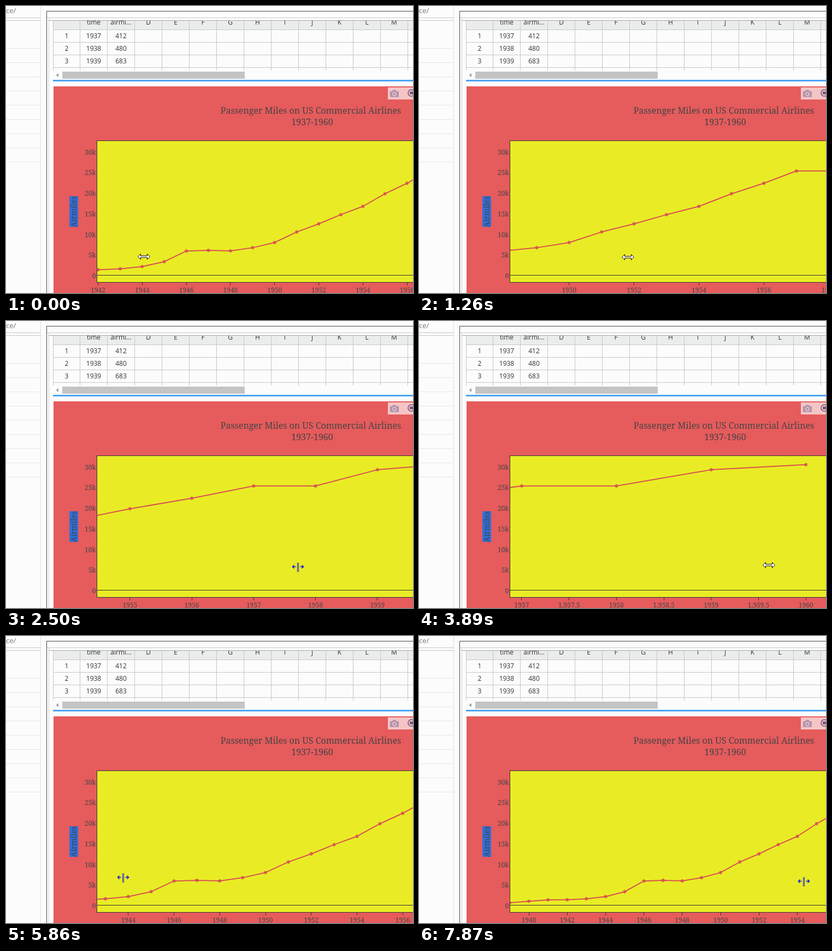
An HTML page that plays this animation: 745x525 px, repeating every 8 s.

```html
<!DOCTYPE html>
<html lang="en">
<head>
<meta charset="utf-8">
<title>Airline passenger miles</title>
<style>
html, body { margin: 0; width: 100%; height: 100%; overflow: hidden; background: #fcfcfc; }
svg { display: block; width: 745px; height: 525px; }
.sans { font: 12px "Open Sans", sans-serif; fill: #333; text-anchor: middle; }
.serif { font: 12px "Noto Serif", serif; fill: #444; text-anchor: middle; }
.title { font-size: 16px; }
.axis { font-size: 14px; }
.end { text-anchor: end; }
.split { mix-blend-mode: difference; }
</style>
</head>
<body>
<svg viewBox="0 0 745 525">
  <defs>
    <clipPath id="plotClip"><rect x="166" y="246" width="579" height="260"/></clipPath>
    <clipPath id="sheetClip"><rect x="78" y="27" width="667" height="91"/></clipPath>
  </defs>
  <rect width="745" height="525" fill="#fcfcfc"/>

  <g fill="none" shape-rendering="crispEdges">
    <path d="M0 21.5H63M0 26.5H63" stroke="#c4c4c4"/>
    <path id="sideRows" stroke="#e6e6e6"/>
    <path d="M63.5 0V525" stroke="#dedede"/>
    <path d="M78.5 22V525" stroke="#d0d0d0"/>
    <path d="M745 9.5H74.5V525" stroke="#484848"/>
    <path d="M75 21.5H745" stroke="#c8c8c8"/>
    <path d="M78 26.5H745" stroke="#a4a4a4"/>
  </g>
  <text x="0" y="13" font-family="Open Sans, sans-serif" font-size="13" fill="#777">ce/</text>

  <g clip-path="url(#sheetClip)">
    <rect x="86" y="27" width="659" height="16" fill="#ebeded"/>
    <path id="sheetLines" fill="none" stroke="#c6c6c6" shape-rendering="crispEdges"/>
    <g id="sheetText" class="sans"></g>
  </g>
  <path d="M91.5 126.5l4.500-3.500v7z" fill="#a0a0a0"/>
  <rect x="103" y="120" width="334" height="13" fill="#c4c4c4"/>
  <rect x="86" y="135" width="659" height="3" fill="#4ca3f3"/>

  <rect x="87" y="147" width="658" height="378" fill="#e65b5c"/>
  <rect x="699" y="149" width="46" height="22" fill="#f5c5c6"/>
  <g fill="#b193ae">
    <path d="M703 156h4l1.500-2.500h5l1.500 2.500h4v10.500h-16z"/>
    <circle cx="711" cy="161" r="3.800" fill="#f5c5c6"/>
    <circle cx="711" cy="161" r="2.300"/>
  </g>
  <circle cx="742" cy="159" r="6" fill="none" stroke="#74547f" stroke-width="1.600"/>
  <rect x="739" y="156.500" width="6" height="5" fill="#74547f"/>

  <text class="serif title" x="558" y="197">Passenger Miles on US Commercial Airlines</text>
  <text class="serif title" x="560.500" y="218">1937-1960</text>
  <rect id="selection" x="116" y="348" width="16" height="56" fill="#2f6fdb"/>
  <text class="serif axis" transform="translate(129 376) rotate(-90)">Airmiles</text>

  <rect x="167" y="247" width="578" height="258" fill="#e9ec25"/>
  <g id="yLabels" class="serif end"></g>
  <g clip-path="url(#plotClip)">
    <path id="line" fill="none" stroke="#d9534f" stroke-width="2" stroke-linejoin="round"/>
    <path id="stars" fill="#d9534f"/>
  </g>
  <g fill="none" stroke="#333" shape-rendering="crispEdges">
    <path d="M167 492.500H745"/>
    <path d="M745 246.500H166.500V505.500H745"/>
    <path id="ticks"/>
  </g>
  <g id="xLabels" class="serif"></g>

  <path id="arrow" d="M-11 0l5-5v3.500h12v-3.500l5 5-5 5v-3.500h-12v3.500z" fill="#fff" stroke="#000"/>
  <g id="split" class="split" fill="none" stroke="#fff">
    <path d="M-1-8V9M1-8V9" shape-rendering="crispEdges"/>
    <path d="M-4 0h-6m3-3l-3 3 3 3M4 0h6m-3-3l3 3-3 3" stroke-width="1.600"/>
  </g>
</svg>
<script>
const $ = id => document.getElementById(id);
const range = (n, fn) => Array.from({ length: n }, (_, i) => fn(i));
const text = (x, y, s) => `<text x="${x}" y="${y}">${s}</text>`;

const LOOP = 8000, STEPS = 58;
const PLOT = { left: 167, width: 785.7, zero: 493.1, perMile: 0.00755 };
const LAST = 1961.41;
const miles = [412, 480, 683, 1052, 1385, 1418, 1634, 2178, 3362, 5948, 6109, 5981,
  6753, 8003, 10566, 12528, 14760, 16769, 19819, 22362, 25340, 25343, 29269, 30514];

// The range handle is dragged right, then back left: step, first visible year, pointer.
const drag = [
  { step: 0, year: 1941.963, x: 252, y: 458, cursor: "arrow" },
  { step: 5, year: 1944.908, x: 303, y: 462, cursor: "arrow" },
  { step: 13, year: 1951.462, x: 460, y: 455, cursor: "split" },
  { step: 22, year: 1956.879, x: 593, y: 444, cursor: "split" },
  { step: 28, year: 1956.879, x: 640, y: 446, cursor: "arrow" },
  { step: 37, year: 1950.5, x: 336, y: 432, cursor: "split" },
  { step: 44, year: 1939.5, x: 165, y: 445, cursor: "split" },
  { step: 49, year: 1939.194, x: 159, y: 450, cursor: "split" },
  { step: 52, year: 1939.03, x: 690, y: 495, cursor: "split" },
  { step: 57, year: 1939.03, x: 704, y: 448, cursor: "split" },
];

function poseAt(step) {
  const i = Math.max(1, drag.findIndex(k => k.step >= step));
  const a = drag[i - 1], b = drag[i];
  const part = (step - a.step) / (b.step - a.step);
  const mix = key => a[key] + (b[key] - a[key]) * part;
  return { year: mix("year"), x: mix("x"), y: mix("y"), cursor: (part < 1 ? a : b).cursor };
}

function star(x, y) {
  const points = range(12, i => {
    const r = i % 2 ? 2.2 : 4, a = i * Math.PI / 6;
    return `${(x + r * Math.sin(a)).toFixed(2)} ${(y - r * Math.cos(a)).toFixed(2)}`;
  });
  return `M${points.join("L")}Z`;
}

function tickStep(span) {
  return [0.2, 0.5, 1, 2, 5].find(s => s >= span / 12);
}

function drawChart(first) {
  const scale = PLOT.width / (LAST - first);
  const toX = year => PLOT.left + (year - first) * scale;
  const points = miles.map((m, i) => [toX(1937 + i), PLOT.zero - m * PLOT.perMile]);
  $("line").setAttribute("d", "M" + points.map(p => p.join(" ")).join("L"));
  $("stars").setAttribute("d", points.map(p => star(...p)).join(""));

  const gap = tickStep(LAST - first);
  let marks = "", labels = "";
  for (let year = Math.ceil(first / gap) * gap; toX(year) < 775; year += gap) {
    const x = toX(year);
    marks += `M${Math.floor(x) + 0.5} 506v5`;
    labels += text(x, 524, year % 1 ? year.toLocaleString("en-US") : year);
  }
  $("ticks").setAttribute("d", marks);
  $("xLabels").innerHTML = labels;
}

function drawStatic() {
  $("sideRows").setAttribute("d", range(9, i => `M0 ${77.5 + 26 * i}H63`).join(""));
  const columns = [86, ...range(13, i => 135 + 50 * i)];
  $("sheetLines").setAttribute("d",
    columns.map(x => `M${x + 0.5} 27V118`).join("") +
    range(4, i => `M86 ${43.5 + 23 * i}H745`).join(""));
  const heads = ["time", "airmi...", ..."DEFGHIJKLM"];
  $("sheetText").innerHTML = heads.map((s, i) => text(160.5 + 50 * i, 34, s)).join("") +
    range(3, i => {
      const y = 59 + 23 * i;
      return text(111, y, i + 1) + text(160.5, y, 1937 + i) + text(210.5, y, miles[i]);
    }).join("");
  $("yLabels").innerHTML = range(7, i =>
    text(164.5, 498 - i * 5000 * PLOT.perMile, i ? i * 5 + "k" : 0)).join("");
}

function draw(step) {
  const pose = poseAt(step);
  drawChart(pose.year);
  // Redrawing the chart briefly drops the text selection.
  $("selection").style.display = step % 11 === 5 ? "none" : "";
  for (const id of ["arrow", "split"]) {
    $(id).setAttribute("transform", `translate(${Math.round(pose.x)}.5 ${Math.round(pose.y)}.5)`);
    $(id).style.display = id === pose.cursor ? "" : "none";
  }
}

let shown = -1;
const begin = performance.now();
function tick() {
  const phase = (performance.now() - begin) % LOOP / LOOP;
  const step = Math.min(STEPS - 1, Math.floor(phase * STEPS + 0.4));
  if (step !== shown) draw(shown = step);
  requestAnimationFrame(tick);
}

drawStatic();
tick();
</script>
</body>
</html>
```
